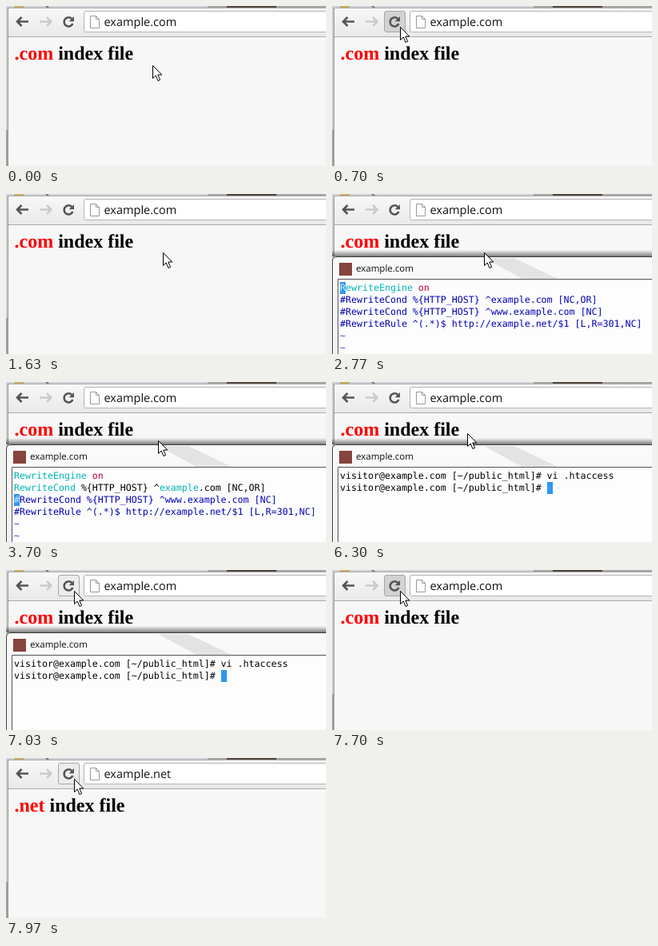
Write an HTML page that moves like this. It is 400 px wide and 200 px high and loops after 8000 ms.

```html
<!DOCTYPE html>
<html lang="en">
<head>
<meta charset="utf-8">
<title>Redirect demo</title>
<style>
  html, body { margin: 0; width: 100%; height: 100%; overflow: hidden; background: #f7f7f7; }
  svg { display: block; width: 400px; height: 200px; }
  text { white-space: pre; text-rendering: geometricPrecision; }
  .ui { font-family: "Open Sans", sans-serif; fill: #111; }
  .heading { font: bold 24px "Liberation Serif", "Times New Roman", serif; }
  .mono { font: 11.627px "DejaVu Sans Mono", monospace; }
</style>
</head>
<body>
<svg viewBox="0 0 400 200">
  <defs>
    <linearGradient id="bar" x2="0" y2="1">
      <stop stop-color="#f8f8f8"/><stop offset="1" stop-color="#e9e9e9"/>
    </linearGradient>
    <linearGradient id="shade" x2="0" y2="1">
      <stop stop-opacity="0"/><stop offset="1" stop-opacity=".5"/>
    </linearGradient>
    <linearGradient id="glass" x2="0" y2="1">
      <stop stop-color="#fafafa"/><stop offset="1" stop-color="#f3f3f3"/>
    </linearGradient>
  </defs>

  <g id="browser">
    <rect width="400" height="200" fill="#f7f7f7"/>
    <rect width="400" height="3" fill="#cfd2d6"/>
    <rect x="10" width="12" height="2" fill="#c5ad5c"/>
    <path d="M49 0h3l3 3h-3z" fill="#777"/>
    <rect x="252" width="148" height="2" fill="#a5a5a5"/>
    <rect x="276" width="62" height="2" fill="#54463d"/>
    <rect x="2" y="2" width="398" height="36" fill="url(#bar)"/>
    <path d="M2 2.5H400" stroke="#a8a8a8"/>
    <path d="M2 38.5H400" stroke="#ababab"/>
    <rect y="3" width="2" height="152" fill="#cfcfcf"/>
    <rect y="155" width="2" height="45" fill="#a2a2a2"/>
    <path d="M2.5 3V200" stroke="#929292"/>
    <rect id="button" x="65.5" y="6.5" width="26" height="26" rx="2.5" stroke="#a6a6a6"/>
    <g fill="none" stroke="#555" stroke-width="2.6">
      <path d="M15 19.5H28M19.5 14L14 19.5L19.5 25"/>
      <path d="M42 19.5H55M51 14L56.5 19.5L51 25" stroke="#cbcbcb"/>
      <path d="M82.4 16.2A5.6 5.6 0 1 0 83.4 22"/>
      <path d="M85 13V19.3H78.7Z" fill="#555" stroke="none"/>
    </g>
    <rect x="97.5" y="6.5" width="310" height="26" rx="2.5" fill="#fff" stroke="#b3b3b3"/>
    <path d="M105.5 12.5H112.5L116.5 16.5V27.5H105.5ZM112.5 12.5V16.5H116.5" fill="#fff" stroke="#999"/>
    <text id="url" class="ui" x="122.5" y="24.5" font-size="14.5"></text>
    <text class="heading" x="10.5" y="67"><tspan id="suffix" fill="#f00"></tspan> index file</text>
  </g>

  <g id="terminal">
    <rect y="70" width="400" height="8" fill="url(#shade)"/>
    <path d="M.5 201V84Q.5 78.5 6 78.5H401V201Z" fill="url(#glass)" stroke="#3c3c3c"/>
    <path d="M190 80H228L282 106H238Z" fill="#e3e3e3"/>
    <rect x="9" y="86" width="16" height="16" fill="#85443c"/>
    <text class="ui" x="30" y="97" font-size="11.5">example.com</text>
    <path d="M7.5 201V106.5H401V201Z" fill="#fdfdfd" stroke="#555"/>
    <rect id="block" width="7" height="15" fill="#2f97f0"/>
    <g id="screen" class="mono"></g>
  </g>

  <path id="pointer" d="M.5 .5V16.5L4.2 13L7 19.5L9.6 18.4L6.8 12H11.8Z" fill="#fff" stroke="#000"/>
</svg>
<script>
const LOOP = 8000, STEP = 200 / 3, PHASE = 100 / 3;
const $ = id => document.getElementById(id);

const RULES = [
  'RewriteEngine on',
  'RewriteCond %{HTTP_HOST} ^example.com [NC,OR]',
  'RewriteCond %{HTTP_HOST} ^www.example.com [NC]',
  'RewriteRule ^(.*)$ http://example.net/$1 [L,R=301,NC]',
  '~', '~'
];
const PROMPT = 'visitor@example.com [~/public_html]# ';

// [time, cursor row, commented-out rows start here]
const EDITS = [
  [0, 0, 1], [3165, 1, 1], [3430, 1, 2], [3698, 2, 2],
  [3965, 2, 3], [4165, 3, 3], [4430, 3, 4]
];
const EXIT = 5165;

// [start, end, from, to, ease-out power]
const MOVES = [
  [33, 640, [183, 74], [85, 26], 1.7],
  [1100, 1633, [85, 26], [196, 73], 1.8],
  [1767, 1967, [196, 73], [190, 73], 1],
  [6233, 7033, [190, 73], [85, 26], 2.5]
];

const within = (t, a, b) => t >= a && t < b;

function pointerAt(t) {
  const [start, end, from, to, power] = MOVES.filter(m => t >= m[0]).pop() || MOVES[0];
  const u = Math.min(1, Math.max(0, (t - start) / (end - start)));
  const p = 1 - (1 - u) ** power;
  return from.map((v, i) => Math.round(v + (to[i] - v) * p));
}

const escapeText = s => s.replace(/&/g, '&amp;').replace(/</g, '&lt;');
const span = (s, color) => `<tspan fill="${color}">${escapeText(s)}</tspan>`;
const line = (row, content) => `<text x="10" y="${121 + row * 15}">${content}</text>`;

function paintRule(rule, row, commented, selected) {
  const plain = rule === '~';
  const text = commented ? '#' + rule : rule;
  const tokens = commented || plain ? [text] : text.split(/(^Rewrite\w+|example| on$)/);
  let content = '', first = selected;
  for (let token of tokens.filter(Boolean)) {
    const color = commented ? '#0000b4' : plain ? '#3b3bd0'
      : /^Rewrite|^example/.test(token) ? '#00b4b4'
      : token === ' on' ? '#c00038' : '#000';
    if (first) {
      content += span(token[0], '#c4efff');
      token = token.slice(1);
      first = false;
    }
    content += span(token, color);
  }
  return line(row, content);
}

let shown = '';
function drawScreen(t) {
  const shell = t >= EXIT;
  const [, cursorRow, firstComment] = EDITS.filter(e => t >= e[0]).pop();
  const key = shell ? 'shell' : cursorRow + ':' + firstComment;
  if (key === shown) return;
  shown = key;
  const row = shell ? 1 : cursorRow;
  $('block').setAttribute('x', shell ? 10 + PROMPT.length * 7 : 10);
  $('block').setAttribute('y', 110 + row * 15);
  $('screen').innerHTML = shell
    ? line(0, span(PROMPT + 'vi .htaccess', '#000')) + line(1, span(PROMPT, '#000'))
    : RULES.map((rule, i) =>
        paintRule(rule, i, i >= firstComment && i < 4, i === cursorRow)).join('');
}

function render(now) {
  const time = Math.max(0, now) % LOOP;
  const t = Math.max(0, Math.floor((time - PHASE + 4) / STEP) * STEP + PHASE);

  const [x, y] = pointerAt(t);
  $('pointer').setAttribute('transform', `translate(${x} ${y})`);

  const hover = within(x, 65, 92) && within(y, 6, 33);
  const pressed = within(t, 699, 830) || within(t, 7632, 7765);
  $('button').style.opacity = hover ? 1 : 0;
  $('button').setAttribute('fill', pressed ? '#d2d2d2' : '#ececec');

  const open = within(t, 1832, 7632);
  $('terminal').style.opacity = open ? Math.min(1, .3 + (t - 1833) / 190) : 0;

  const suffix = t >= 7832 ? '.net' : '.com';
  $('url').textContent = 'example' + suffix;
  $('suffix').textContent = suffix;
  drawScreen(t);
}

const origin = performance.now();
function tick() {
  render(performance.now() - origin);
  requestAnimationFrame(tick);
}
tick();
</script>
</body>
</html>
```
